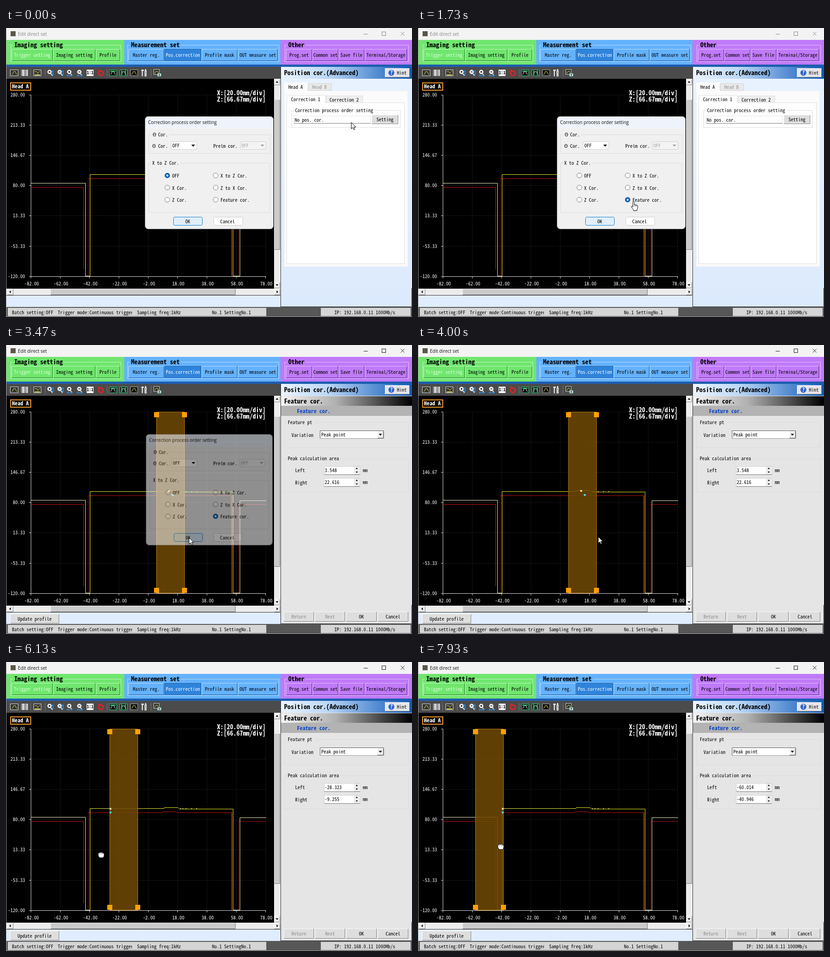
These frames come from a looping animation (886 px wide and 632 px high, 8 s). An HTML page with a canvas:

```html
<!DOCTYPE html>
<html lang="en">
<head>
<meta charset="utf-8">
<title>Edit direct set</title>
<style>
html, body { margin: 0; width: 100%; height: 100%; overflow: hidden; background: #fff; }
canvas { display: block; width: 886px; height: 632px; }
</style>
</head>
<body>
<canvas id="stage" width="886" height="632"></canvas>
<script>
const screen2d = document.getElementById('stage').getContext('2d');
const layer = document.createElement('canvas');
layer.width = 886;
layer.height = 632;
const layer2d = layer.getContext('2d');
let c = screen2d;

const LOOP = 8000, CLOSE_AT = 3400, FADE = 165, PICK_AT = 1600, DRAG_AT = 5260;
const MONO = '"Noto Sans Mono CJK SC", "Noto Sans Mono CJK JP", "Liberation Mono", monospace';
const SANS = '"Open Sans", "Noto Sans", sans-serif';
const SMALL = 5.32, MID = 6.1, BIG = 7.07;

// Font size that gives the wanted advance per character
c.font = `100px ${MONO}`;
const advance = c.measureText('0').width / 100;

function text(s, x, y, color = '#000', pitch = SMALL, bold = false, align = 'left') {
  c.font = `${bold ? 'bold ' : ''}${pitch / advance}px ${MONO}`;
  c.textAlign = align;
  c.fillStyle = color;
  c.fillText(s, x, y + pitch * 0.66);
}
function title(s, x, y, color) {
  c.font = `10px ${SANS}`;
  c.textAlign = 'left';
  c.fillStyle = color;
  c.fillText(s, x, y + 3.5);
}
function box(x, y, w, h, fill, stroke) {
  if (fill) { c.fillStyle = fill; c.fillRect(x, y, w, h); }
  if (stroke) { c.strokeStyle = stroke; c.lineWidth = 1; c.strokeRect(x + 0.5, y + 0.5, w - 1, h - 1); }
}
function line(points, color, width = 1) {
  c.strokeStyle = color;
  c.lineWidth = width;
  c.beginPath();
  points.forEach(([x, y]) => c.lineTo(x + 0.5, y + 0.5));
  c.stroke();
}
function round(x, y, w, h, r, fill, stroke) {
  c.beginPath();
  c.roundRect(x + 0.5, y + 0.5, w - 1, h - 1, r);
  c.fillStyle = fill;
  c.fill();
  if (stroke) { c.strokeStyle = stroke; c.lineWidth = 1; c.stroke(); }
}
function disc(x, y, r, fill, stroke, width = 1) {
  c.beginPath();
  c.arc(x, y, r, 0, 7);
  if (fill) { c.fillStyle = fill; c.fill(); }
  if (stroke) { c.strokeStyle = stroke; c.lineWidth = width; c.stroke(); }
}
function ramp(x, y, w, h, dx, dy, ...stops) {
  const g = c.createLinearGradient(x, y, x + dx, y + dy);
  stops.forEach(([at, color]) => g.addColorStop(at, color));
  box(x, y, w, h, g);
}
function triangle(x, y, r, angle, color = '#000') {
  c.save();
  c.translate(x, y);
  c.rotate(angle);
  c.fillStyle = color;
  c.beginPath();
  c.moveTo(-r, -r / 2);
  c.lineTo(r, -r / 2);
  c.lineTo(0, r / 2 + 0.5);
  c.fill();
  c.restore();
}
function bevel(x, y, w, h, fill, light, dark) {
  box(x, y, w, h, fill);
  line([[x, y + h - 1], [x, y], [x + w - 1, y]], light);
  line([[x + w - 1, y], [x + w - 1, y + h - 1], [x, y + h - 1]], dark);
}
function button(s, x, y, w, h, color = '#000') {
  bevel(x, y, w, h, '#dedede', '#f8f8f8', '#858585');
  text(s, x + w / 2, y + h / 2 + 0.5, color, SMALL, false, 'center');
}
function group(s, x, y, w, h, stroke, fill) {
  box(x, y, w, h, null, stroke);
  box(x + 6, y, s.length * SMALL + 5, 1, fill);
  text(s, x + 8, y + 0.5);
}

function titleBar(active) {
  const ink = active ? '#151515' : '#858585';
  box(0, 0, 886, 26, '#f3f3f3');
  box(10, 7, 11, 11, '#5b564a');
  title('Edit direct set', 26, 13, ink);
  line([[780, 13], [789, 13]], ink);
  box(820, 8, 9, 9, null, ink);
  line([[861, 8], [869, 16]], ink);
  line([[869, 8], [861, 16]], ink);
}

const MENU = [
  { name: 'Imaging setting', x: 0, w: 258, fill: '#70e66e', rim: '#c4f8c2', dark: '#268828', left: 10, right: 251,
    items: [['Trigger setting', 12, 102], ['Imaging setting', 103, 195], ['Profile', 196, 249]] },
  { name: 'Measurement set', x: 258, w: 341, fill: '#64b2fc', rim: '#b8dcff', dark: '#1f5fa8', left: 265, right: 596,
    items: [['Master reg.', 267, 345], ['Pos.correction', 346, 426], ['Profile mask', 427, 505], ['OUT measure set', 506, 593]] },
  { name: 'Other', x: 599, w: 287, fill: '#c07af8', rim: '#e2c2ff', dark: '#64309a', left: 608, right: 879,
    items: [['Prog.set', 611, 668], ['Common set', 669, 725], ['Save file', 726, 782], ['Terminal/Storage', 783, 875]] }
];
function menu() {
  for (const m of MENU) {
    box(m.x, 26, m.w, 54, m.fill);
    box(m.left, 37, m.right - m.left, 37, null, m.rim);
    box(m.left + 5, 37, m.name.length * BIG + 5, 1, m.fill);
    text(m.name, m.left + 8, 37, '#000', BIG, true);
    for (const [s, a, b] of m.items) {
      const chosen = s === 'Pos.correction';
      bevel(a, 46, b - a, 26, chosen ? '#2f83db' : m.fill, chosen ? '#1f5fa8' : m.rim, m.dark);
      const ink = chosen ? '#fff' : s === 'Trigger setting' ? '#dcffdc' : '#000';
      text(s, (a + b) / 2, 59, ink, SMALL, false, 'center');
    }
  }
  box(0, 80, 886, 5, '#1d5daf');
}

function lens(x, sign, dx, dy) {
  line([[x + 2, 99], [x + 6, 104]], '#eee', 2);
  disc(x, 96, 4.5, '#f6f6f6', '#bbb');
  line([[x - 2.5, 95.5], [x + 1.5, 95.5]], '#111', 1.5);
  if (sign) line([[x - 0.5, 93.5], [x - 0.5, 97.5]], '#111', 1.5);
  const ax = x + (dx ? 1 : 7), ay = dx ? 104 : 98;
  line([[ax - dx, ay - dy], [ax + dx, ay + dy]], '#2a90e8', 1.5);
  triangle(ax + dx, ay + dy, 2.5, dx ? -Math.PI / 2 : 0, '#2a90e8');
  triangle(ax - dx, ay - dy, 2.5, dx ? Math.PI / 2 : Math.PI, '#2a90e8');
}
function toolbar() {
  box(0, 85, 599, 26, '#4b4b4b');
  [53, 85, 220, 316].forEach(x => line([[x, 89], [x, 106]], '#767676'));
  const hill = (x, color) => line([[x + 2, 101], [x + 4, 100], [x + 6, 95], [x + 10, 95], [x + 12, 100], [x + 14, 101]], color);
  box(9, 91, 18, 14, '#333', '#ddd');
  hill(10, '#e4dc40');
  ramp(32, 91, 16, 14, 16, 0, [0, '#555'], [0.35, '#e8e8e8'], [0.6, '#888'], [1, '#ddd']);
  box(60, 91, 17, 14, '#333', '#ddd');
  line([[62, 95], [67, 95], [69, 99], [74, 93]], '#e4dc40');
  line([[62, 102], [74, 102]], '#e4dc40', 2);
  lens(95, true, 0, 4);
  lens(117, false, 0, 4);
  lens(138, true, 5, 0);
  lens(160, false, 5, 0);
  box(176, 91, 15, 14, '#fff');
  text('1:1', 183.5, 98, '#000', 4.8, true, 'center');
  c.beginPath();
  c.arc(207, 99, 5, -2, 3.6);
  c.strokeStyle = '#e02424';
  c.lineWidth = 3;
  c.stroke();
  triangle(203, 94, 4, 0.8, '#e02424');
  [225, 248, 271].forEach((x, i) => {
    box(x, 91, 17, 14, '#111', i < 2 ? '#36c878' : '#aaa');
    hill(x, i < 2 ? '#eee' : '#e4dc40');
  });
  line([[227, 94], [239, 94]], '#36c878', 2);
  line([[252, 92], [252, 103]], '#36c878', 2);
  line([[260, 92], [260, 103]], '#36c878', 2);
  line([[295, 92], [300, 92]], '#fff', 3);
  line([[297, 91], [297, 105]], '#fff', 2);
  text('A', 302, 94, '#fff', SMALL, true);
  text('B', 302, 102, '#fff', SMALL, true);
  box(322, 90, 13, 12, '#333', '#ccc');
  line([[324, 99], [327, 94], [330, 94], [333, 100]], '#e4dc40');
  box(330, 99, 9, 7, '#ddd', '#36a8a0');
  disc(334.5, 102.5, 1.5, '#333');
}

const MM = 0.3125, X0 = 54.5;
const toX = mm => X0 + (mm + 82) / MM;

function plot() {
  box(0, 111, 585, 459, '#000');
  c.setLineDash([1, 2]);
  for (let i = 1; i < 9; i++) line([[54 + 64 * i, 146], [54 + 64 * i, 542]], '#3c3c3c');
  for (let i = 0; i < 6; i++) line([[54, 146 + Math.round(66.1 * i)], [567, 146 + Math.round(66.1 * i)]], '#3c3c3c');
  c.setLineDash([]);
  line([[54, 146], [54, 543], [567, 543]], '#e0e0e0');
  for (let i = 0; i < 7; i++) {
    const y = 146 + Math.round(66.1 * i);
    line([[50, y], [54, y]], '#e0e0e0');
    text((280 - i * 400 / 6).toFixed(2), 41.5, y + 0.5, '#fff', SMALL, false, 'right');
  }
  for (let i = 0; i < 9; i++) {
    line([[54 + 64 * i, 543], [54 + 64 * i, 547]], '#e0e0e0');
    text((20 * i - 82).toFixed(2), 56 + 64 * i, 559, '#fff', SMALL, false, 'center');
  }
  const red = '#d81414', dim = '#700c0c', pale = '#f3f0c0', yellow = '#eeee24';
  line([[54, 348], [169, 348], [169, 527]], red);
  line([[179, 542], [179, 329]], dim);
  line([[179, 329], [341, 329], [342, 327], [370, 327], [372, 329], [492, 329]], '#c41212');
  line([[492, 329], [492, 542]], red, 2);
  line([[507, 542], [507, 348]], dim);
  line([[507, 348], [567, 348]], '#b41010');
  line([[54, 339], [173, 339], [173, 542], [183, 542]], pale);
  line([[495, 542], [510, 542], [510, 340], [567, 340]], pale);
  line([[183, 542], [183, 320], [344, 320], [345, 318], [375, 318], [378, 321], [495, 321], [495, 542]], yellow);
  [380, 385, 392, 404, 415].forEach(x => box(x, 320, 2, 1, pale));
  box(9, 119, 46, 18, '#000');
  c.strokeStyle = '#f0982c';
  c.lineWidth = 2;
  c.strokeRect(10, 120, 44, 16);
  text('Head A', 13, 128, '#fff', MID, true);
  text('X:[20.00mm/div]', 460.5, 142, '#fff', BIG, true);
  text('Z:[66.67mm/div]', 460.5, 156, '#fff', BIG, true);
}
function scrollBars() {
  box(585, 111, 13, 459, '#ececec');
  bevel(585, 156, 13, 329, '#cbcbcb', '#eee', '#777');
  bevel(585, 112, 13, 13, '#eee', '#fff', '#888');
  bevel(585, 555, 13, 14, '#eee', '#fff', '#888');
  triangle(591.5, 118, 3, Math.PI);
  triangle(591.5, 562, 3, 0);
  box(0, 570, 599, 14, '#ececec');
  bevel(97, 570, 404, 14, '#cbcbcb', '#eee', '#777');
  bevel(2, 570, 14, 14, '#eee', '#fff', '#888');
  bevel(585, 570, 13, 14, '#eee', '#fff', '#888');
  triangle(9, 577, 3, Math.PI / 2);
  triangle(592, 577, 3, -Math.PI / 2);
}
function statusBar(active) {
  box(0, 584, 599, 26, '#e0edfe');
  line([[0, 584], [598, 584]], '#333');
  if (active) button('Update profile', 9, 588, 107, 21);
  box(0, 610, 886, 22, '#575757');
  box(4, 612, 564, 18, '#d5d5d5');
  box(687, 612, 196, 18, '#d5d5d5');
  text('Batch setting:OFF', 13, 622);
  c.save();
  c.beginPath();
  c.rect(113, 612, 162, 18);
  c.clip();
  text('Trigger mode:Continuous trigger', 113, 622);
  c.restore();
  text('Sampling freq:1kHz', 286, 622);
  text('No.1 SettingNo.1', 449.5, 622);
  text('IP: 192.168.0.11 1000Mb/s', 716.5, 622);
}

function panelHead() {
  ramp(600, 85, 286, 26, 286, 0, [0, '#ecf4ff'], [0.35, '#bcd8f6'], [1, '#0d58b8']);
  text('Position cor.(Advanced)', 607, 98, '#000', BIG, true);
  bevel(827, 88, 54, 20, '#e6e6ea', '#fff', '#777');
  disc(841, 98, 6.5, '#2d62cc', '#8fb0ea');
  text('?', 841, 98, '#fff', MID, true, 'center');
  text('Hint', 853, 98.5);
}
function tabPanel() {
  ramp(600, 111, 286, 499, 0, 499, [0, '#e8f2ff'], [1, '#dceafd']);
  box(607, 137, 270, 385, '#fbfbfb', '#f2f2f2');
  box(607, 119, 51, 19, '#fbfbfb');
  box(659, 121, 52, 16, '#e9e9e9', '#d4d4d4');
  text('Head A', 616, 129);
  text('Head B', 668, 129, '#929292');
  box(612, 163, 258, 353, '#fff', '#dcdcdc');
  box(613, 147, 85, 17, '#fff', '#e2e2e2');
  box(614, 162, 83, 3, '#fff');
  box(698, 148, 81, 16, '#f0f0f0', '#dadada');
  text('Correction 1', 622, 156);
  text('Correction 2', 706, 157);
  group('Correction process order setting', 623, 180, 238, 38, '#dcdcdc', '#fff');
  box(628, 192, 168, 17, '#fff', '#e4e4e4');
  line([[628, 208], [795, 208]], '#777');
  text('No pos. cor.', 630, 201);
  button('Setting', 798, 190, 58, 20);
}
function spinner(value, y) {
  box(694, y - 9, 79, 19, '#fff', '#d0d0d0');
  line([[694, y + 9], [772, y + 9]], '#777');
  text(value.toFixed(3), 695.5, y + 0.5);
  box(760, y - 8, 11, 17, '#f0f0f0', '#ddd');
  triangle(765.5, y - 4, 2.5, Math.PI);
  triangle(765.5, y + 4, 2.5, 0);
  text('mm', 778.5, y + 0.5);
}
function featurePanel(left) {
  box(600, 111, 286, 499, '#e5e5e5');
  ramp(600, 112, 286, 21, 286, 0, [0, '#f4f4f4'], [0.42, '#b0b0b0'], [0.97, '#080808'], [1, '#000']);
  text('Feature cor.', 607, 123, '#000', BIG, true);
  box(600, 133, 286, 22, '#b3b3b3');
  text('Feature cor.', 635, 144.5, '#0c46c4', MID, true);
  group('Feature pt', 607, 169, 272, 56, '#dbdbdb', '#e5e5e5');
  text('Variation', 623, 197);
  bevel(685, 187, 140, 18, '#fff', '#555', '#999');
  bevel(810, 188, 14, 16, '#eee', '#fff', '#666');
  triangle(817, 196, 3.5, 0);
  text('Peak point', 688, 196.5);
  group('Peak calculation area', 607, 248, 272, 74, '#dbdbdb', '#e5e5e5');
  text('Left', 631, 274.5);
  text('Right', 631, 301);
  spinner(left, 274);
  spinner(left + 19.068, 300);
  button('Return', 606, 583, 66, 22, '#8c8c8c');
  button('Next', 674, 583, 66, 22, '#8c8c8c');
  button('OK', 742, 583, 67, 22);
  button('Cancel', 811, 583, 67, 22);
}

function area(left) {
  const a = Math.round(toX(left)), b = a + 61;
  box(a, 146, b - a, 397, 'rgba(110,73,4,.87)');
  box(a, 146, b - a + 1, 397, null, '#bd7c14');
  for (const x of [a, b]) for (const y of [152, 536]) box(x - 5, y - 5, 11, 11, '#ffa008');
  const peak = (top, edge) => b > top ? Math.max(top, a + 2) : Math.min(Math.max(edge, a + 2), b - 1);
  box(peak(356, 187) - 2, b > 356 ? 317 : 319, 4, 4, '#f0d890');
  box(peak(364, 185) - 2, b > 364 ? 326 : 327, 4, 4, '#54d6ee');
}

const OPTIONS = [['OFF', 'X Cor.', 'Z Cor.'], ['X to Z Cor.', 'Z to X Cor.', 'Feature cor.']];
function combo(x, ink, fill) {
  round(x, 248, 57, 18, 2, fill, '#cfcfcf');
  text('OFF', x + 3, 257.5, ink);
  triangle(x + 48.5, 257, 4, 0, ink);
}
function dialogBody(picked) {
  round(303, 193, 281, 247, 7, '#f0f0f0', '#909090');
  c.beginPath();
  c.roundRect(304, 194, 279, 26, [6, 6, 0, 0]);
  c.fillStyle = '#eff3fb';
  c.fill();
  title('Correction process order setting', 310, 206.5, '#111');
  box(311, 233, 266, 42, null, '#dcdcdc');
  box(318, 233, 38, 1, '#f0f0f0');
  [233, 258].forEach((y, i) => {
    text('Θ', 320 - i, y);
    text('Cor.', 332, y);
  });
  combo(360, '#000', '#fff');
  text('Prelm cor.', 452.5, 258);
  combo(511, '#a0a0a0', '#f4f4f4');
  group('X to Z Cor.', 311, 295, 265, 109, '#dcdcdc', '#f0f0f0');
  OPTIONS.forEach((column, i) => column.forEach((s, j) => {
    const x = 352 + 105.5 * i, y = 322.5 + 26.5 * j;
    const on = s === (picked ? 'Feature cor.' : 'OFF');
    disc(x, y, on ? 4 : 5.3, '#fff', on ? '#0f62b6' : '#777', on ? 3.6 : 1);
    text(s, x + 10.5, y + 1);
  }));
  round(365, 413, 64, 19, 3, '#e0eef9', '#1480d4');
  round(453, 413, 64, 19, 3, '#fdfdfd', '#cdcdcd');
  text('OK', 396.5, 423, '#000', SMALL, false, 'center');
  text('Cancel', 483.5, 423, '#000', SMALL, false, 'center');
}
// The dialog is painted on its own layer so that it fades as one piece
function dialog(picked, shut) {
  c = layer2d;
  c.clearRect(0, 0, 886, 632);
  dialogBody(picked);
  c = screen2d;
  c.save();
  c.globalAlpha = 1 - shut;
  c.translate(443, 316);
  c.scale(1 - 0.038 * shut, 1 - 0.038 * shut);
  c.drawImage(layer, -443, -316);
  c.restore();
}

const ARROW = new Path2D('M0 0V14L3.3 11L5.6 16L7.8 15L5.6 10.2H10Z');
const HAND = new Path2D('M-1.6 1Q-1.6-.6 0-.6T1.6 1V7Q3 6.2 4 7.4Q5.5 6.8 6.3 8Q8.6 7.6 9 10V13Q8.6 16 7.4 17V20H-.2V18Q-3 15-4.8 11.6Q-4.8 9.6-3 10L-1.6 11.8Z');
const GRAB = new Path2D('M-6.5-2Q-6-4.5-3.8-4Q-2.8-6-.8-5Q1-6.2 2.4-4.6Q5-5 5.6-2.5Q7-2 6.8 0Q6.8 4 4.5 6.5H-3.5Q-6.8 3-6.5-2Z');
const PATH = [[0, 753, 206], [200, 753, 206], [1350, 470, 379], [1950, 470, 379], [2700, 399, 421], [3800, 399, 421],
  [4550, 364, 412], [5300, 364, 412], [6500, 160, 412], [7720, 160, 412], [7933, 178, 394], [8000, 181, 391]];

function pointer(t) {
  const i = Math.max(1, PATH.findIndex(p => p[0] > t));
  const [t0, x0, y0] = PATH[i - 1], [t1, x1, y1] = PATH[i];
  const u = Math.min(1, Math.max(0, (t - t0) / (t1 - t0))), e = u * u * (3 - 2 * u);
  return [x0 + (x1 - x0) * e, y0 + (y1 - y0) * e];
}
// The area trails the pointer while it is dragged
function areaLeft(t) {
  const x = t < DRAG_AT ? 364 : pointer(t - 232.2)[0];
  return 3.548 - 63.562 * (364 - x) / 204;
}
function cursor(t, left) {
  const [x, y] = pointer(t);
  const over = (a, b, w, h) => x > a && x < a + w && y > b && y < b + h;
  const hot = t < CLOSE_AT
    ? over(450, 368, 80, 15) || over(365, 413, 64, 19)
    : over(toX(left), 146, 61, 397);
  const grabbing = t >= DRAG_AT;
  const shape = grabbing ? GRAB : hot ? HAND : ARROW;
  c.save();
  c.translate(Math.round(x) + (grabbing ? 2 : 0) + 0.5, Math.round(y) + (grabbing ? 9 : 0) + 0.5);
  c.fillStyle = '#fff';
  c.strokeStyle = '#000';
  c.lineWidth = 1;
  c.fill(shape);
  c.stroke(shape);
  if (shape !== ARROW) {
    c.lineWidth = 0.7;
    c.stroke(new Path2D(grabbing ? 'M-3.5-3.5V-1M-.5-4.5V-1.5M2.5-4V-1' : 'M1.6 7V10M4 7.6V10.5M6.4 8.2V11'));
  }
  c.restore();
}

function draw(now) {
  const t = Math.floor((now % LOOP + 5) * 0.015) / 0.015 % LOOP;
  const open = t < CLOSE_AT - 1;
  const shut = open ? 0 : Math.min(1, Math.max(0, (t - CLOSE_AT) / FADE));
  const left = areaLeft(t);
  titleBar(!open);
  menu();
  toolbar();
  plot();
  if (!open) area(left);
  scrollBars();
  statusBar(!open);
  panelHead();
  if (open) tabPanel();
  else featurePanel(left);
  line([[599, 85], [599, 609]], '#222');
  line([[885, 568], [885, 609]], '#222');
  line([[599, 609], [885, 609]], '#333');
  if (shut < 1) dialog(t >= PICK_AT, shut);
  cursor(t, left);
  line([[0, 0], [0, 631], [885, 631]], '#a0a0a0');
}
const start = performance.now();
function tick() {
  draw(performance.now() - start);
  requestAnimationFrame(tick);
}
tick();
</script>
</body>
</html>
```
